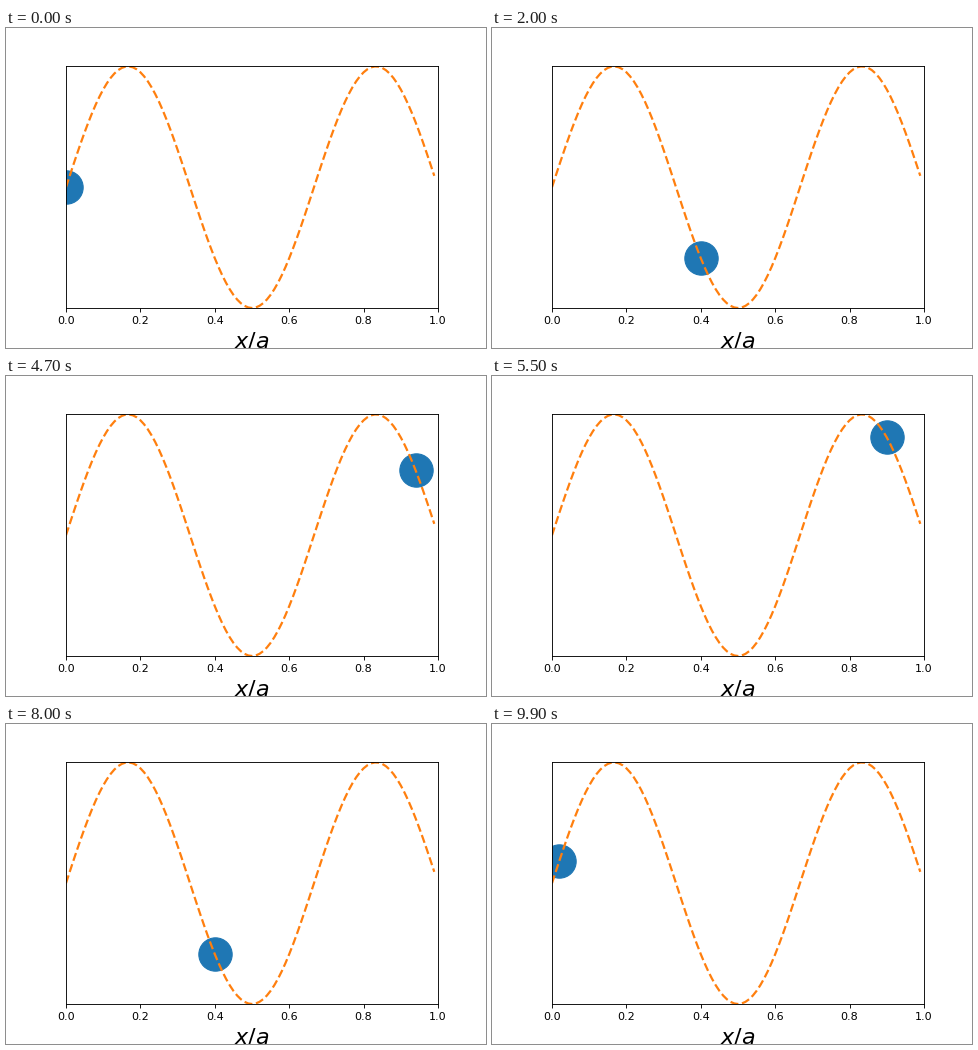
A matplotlib script that plays this animation: 480x320 px, repeating every 10000 ms.

```python
import numpy as np
import matplotlib.pyplot as plt
from matplotlib.animation import FuncAnimation

FRAMES = 100
STEP = 0.02


def wave(x):
    return np.sin(3 * np.pi * x)


fig, ax = plt.subplots(figsize=(6, 4), dpi=80)
fig.subplots_adjust(left=0.125, right=0.9, bottom=0.125, top=0.88)
ax.set_xlim(0, 1)
ax.set_ylim(-1, 1)
ax.set_yticks([])
ax.set_xlabel("$x/a$", fontsize=20)

ball, = ax.plot([], [], "o", color="C0", markersize=30)
xs = np.arange(0, 1, 0.01)
ax.plot(xs, wave(xs), "--", color="C1", lw=2)


def update(frame):
    # Out to the right wall and back at constant horizontal speed
    x = 1 - abs(1 - STEP * frame)
    ball.set_data([x], [wave(x)])
    return ball,


anim = FuncAnimation(fig, update, frames=FRAMES, interval=100, repeat=True)
plt.show()
```
